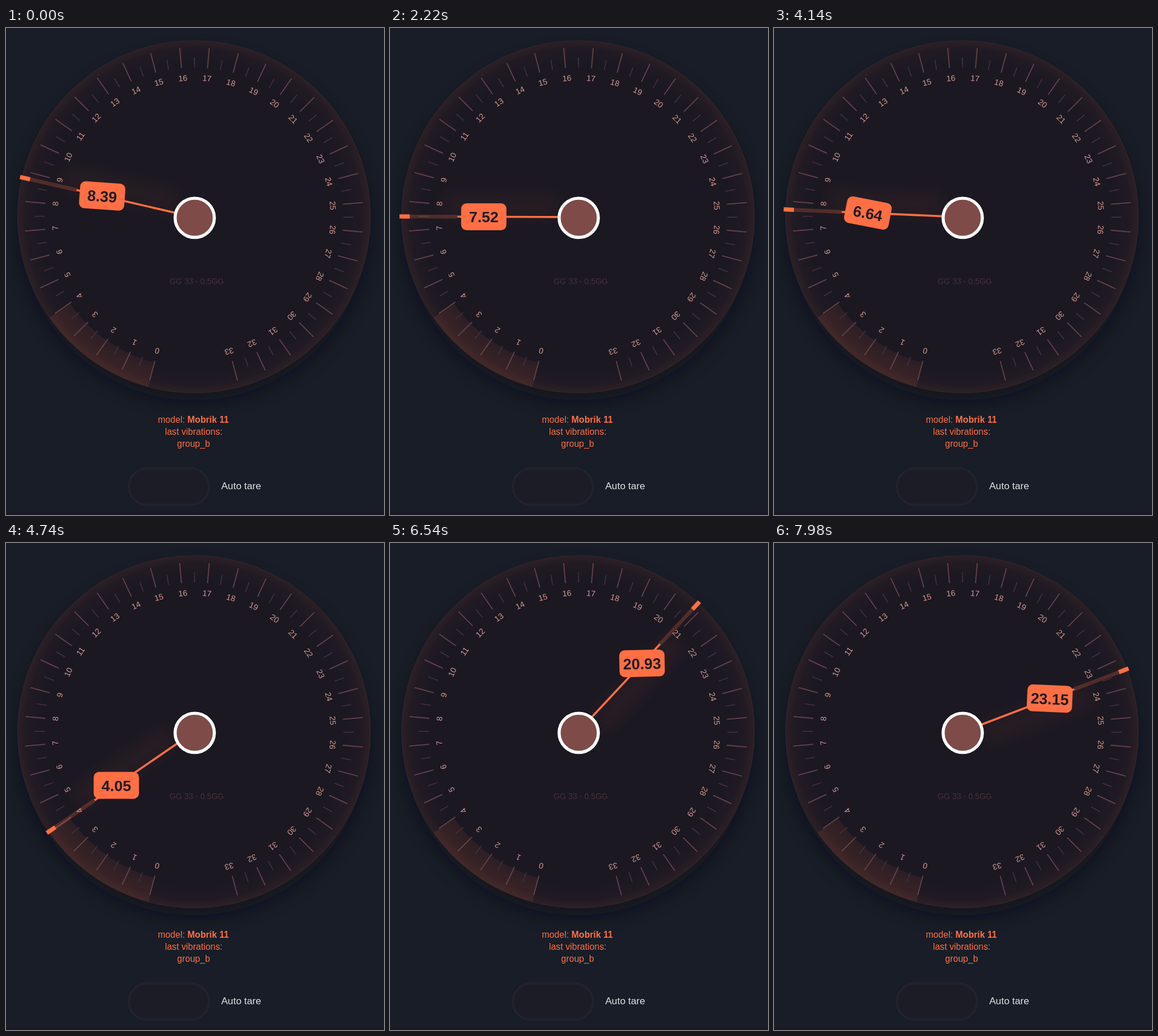
Write an HTML page that moves like this. It is 659 by 850 pixels and loops after 8 s.

```html
<!DOCTYPE html>
<html lang="en">
<head>
<meta charset="utf-8">
<title>Force gauge</title>
<style>
  html, body { margin: 0; width: 100%; height: 100%; overflow: hidden; background: #181d27; }
  svg { display: block; width: 100vw; height: 100vh; font-family: "Liberation Sans", Arial, sans-serif; }
  text { text-anchor: middle; }
  .major { stroke: #64424a; stroke-width: 1.8; }
  .minor { stroke: #42323a; stroke-width: 1.6; }
  .label { font-size: 14px; fill: #d4998f; }
  .info { font-size: 15.7px; fill: #ff6f43; }
</style>
</head>
<body>
<svg viewBox="0 0 659 850">
  <defs>
    <radialGradient id="face" gradientUnits="userSpaceOnUse" cx="0" cy="0" r="308">
      <stop offset=".87" stop-color="#1b1822"/>
      <stop offset=".95" stop-color="#211a23"/>
      <stop offset="1" stop-color="#2d2026"/>
    </radialGradient>
    <radialGradient id="zone" gradientUnits="userSpaceOnUse" cx="0" cy="0" r="307">
      <stop offset=".85" stop-color="#ff6f43" stop-opacity=".075"/>
      <stop offset="1" stop-color="#ff6f43" stop-opacity=".115"/>
    </radialGradient>
    <filter id="soft" x="-50%" y="-50%" width="200%" height="200%"><feGaussianBlur stdDeviation="16"/></filter>
    <filter id="haze" filterUnits="userSpaceOnUse" x="-70" y="-330" width="190" height="370"><feGaussianBlur stdDeviation="13"/></filter>
    <filter id="edge"><feGaussianBlur stdDeviation="1.2"/></filter>
  </defs>

  <rect width="659" height="850" fill="#181d27"/>
  <rect y="846" width="659" height="4" fill="#1a1923"/>

  <g transform="translate(327.8 329.5)">
    <circle cy="18" r="302" fill="#0e1118" opacity=".6" filter="url(#soft)"/>
    <circle r="307.5" fill="url(#face)" stroke="#33252b"/>
    <path id="arc" fill="url(#zone)"/>
    <g id="scale"></g>
  </g>
  <text x="332.5" y="447" font-size="14" fill="#46303a">GG 33 - 0.5GG</text>

  <g transform="translate(327.5 330)">
    <g id="needle">
      <rect x="-2" y="-235" width="42" height="200" fill="#ff6f43" opacity=".05" filter="url(#haze)"/>
      <rect x="-1.8" y="-210" width="3.6" height="180" fill="#ff6f43"/>
      <rect x="-3.3" y="-293" width="6.6" height="83" fill="#ff6f43" opacity=".23"/>
      <rect x="-3.7" y="-311" width="7.4" height="18" fill="#ff6f43"/>
      <g id="badge">
        <rect x="-39.5" y="-23.5" width="79" height="47" rx="9.5" fill="#ff6f43"/>
        <text id="value" y="10" font-size="26.5" font-weight="700" fill="#211a24"></text>
      </g>
    </g>
  </g>
  <circle cx="329" cy="331.3" r="34.2" fill="#7e4b48" stroke="#fff" stroke-width="5.4"/>

  <g class="info">
    <text x="326.7" y="688.5">model: <tspan font-weight="700">Mobrik 11</tspan></text>
    <text x="327.3" y="709.5">last vibrations:</text>
    <text x="327" y="730.5">group_b</text>
  </g>

  <rect x="214" y="768.5" width="140" height="64" rx="32" fill="#1c1e27" stroke="#21242e" stroke-width="4" filter="url(#edge)"/>
  <text x="410" y="804.5" font-size="17.2" fill="#e0e1e5">Auto tare</text>
</svg>
<script>
  const LOOP = 8000, STEP = 60, LAG = 0.12, MAX = 33;
  const $ = id => document.getElementById(id);
  const angle = v => 195 + v * 10;

  function add(parent, tag, attrs, text = "") {
    const el = document.createElementNS("http://www.w3.org/2000/svg", tag);
    for (const k in attrs) el.setAttribute(k, attrs[k]);
    el.textContent = text;
    parent.appendChild(el);
  }

  function polar(r, v) {
    const a = angle(v) * Math.PI / 180;
    return (r * Math.sin(a)).toFixed(2) + " " + (-r * Math.cos(a)).toFixed(2);
  }

  function buildScale() {
    $("arc").setAttribute("d",
      `M${polar(307, 0)}A307 307 0 0 1 ${polar(307, 4)}L${polar(264, 4)}A264 264 0 0 0 ${polar(264, 0)}Z`);
    for (let v = 0; v <= MAX; v += 0.5) {
      const major = v % 1 === 0;
      const transform = `rotate(${angle(v)})`;
      add($("scale"), "line", {
        transform, class: major ? "major" : "minor",
        x1: 0.8, x2: 0.8, y1: -260.5, y2: major ? -295.5 : -278
      });
      if (major) add($("scale"), "text", { transform, class: "label", x: 1.6, y: -237.8 }, v);
    }
  }

  // Needle path: seconds, reading, slope per second
  const path = [
    [0, 8.8, -3.42], [.3, 8.35, -.3], [.9, 8.2, -.6], [1.6, 7.65, -.6], [2.22, 7.52, 0],
    [2.76, 7.55, .2], [3.48, 9.73, 5.5], [3.72, 10.4, -.5], [4.2, 7.2, -9], [4.74, 4.05, 0],
    [5.1, 4.05, 0], [5.64, 7.86, 0], [5.85, 7.9, .5], [6.12, 14, 28], [6.3, 18.7, 15],
    [6.54, 20.8, 1.083], [6.8, 21.2, 3], [7.35, 23.8, .5], [7.7, 23.65, -.2], [7.98, 23.41, -2.167]
  ];

  // Cubic Hermite position and speed
  function sample(t) {
    let i = 0;
    while (i < path.length - 2 && t >= path[i + 1][0]) i++;
    const [t0, a, m] = path[i], [t1, b, n] = path[i + 1];
    const d = t1 - t0, u = (t - t0) / d, w = 1 - u;
    return {
      pos: a * (1 + 2 * u) * w * w + b * u * u * (3 - 2 * u) + d * u * w * (m * w - n * u),
      speed: 6 * u * w * (b - a) / d + m * w * (1 - 3 * u) + n * u * (3 * u - 2)
    };
  }

  function draw(ms) {
    const t = Math.floor((ms % LOOP) / STEP) * STEP / 1000;
    const { pos, speed } = sample(t);
    const reading = pos + LAG * speed;
    $("needle").setAttribute("transform", `rotate(${angle(pos)})`);
    // The badge is levelled by the reading, so it tilts while the needle lags
    $("badge").setAttribute("transform", `translate(0 -164) rotate(${-angle(reading)})`);
    $("value").textContent = reading.toFixed(2);
  }

  buildScale();
  draw(0);
  const start = performance.now();
  (function tick() {
    draw(performance.now() - start);
    requestAnimationFrame(tick);
  })();
</script>
</body>
</html>
```
